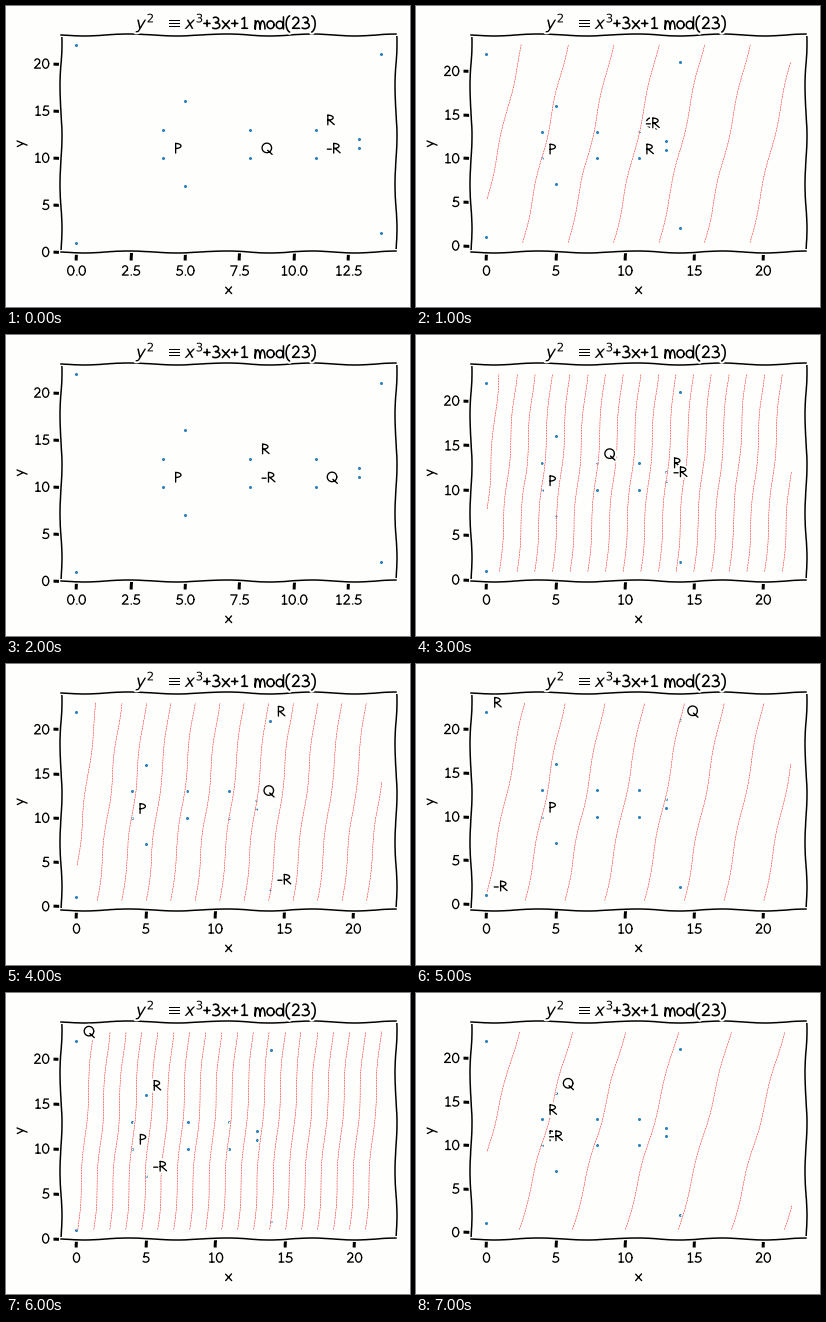
Animation, 404 px wide and 301 px high, one loop 8 s. Source, as a matplotlib script:

```python
import numpy as np
import matplotlib.pyplot as plt
from matplotlib.animation import FuncAnimation
from matplotlib.patches import PathPatch
from matplotlib.path import Path
from matplotlib.patheffects import Normal, Stroke, withStroke
from matplotlib.ticker import MultipleLocator
from matplotlib.transforms import IdentityTransform

W, H, DPI = 404, 301, 72
PAPER = "#fefefc"
LEFT, BOTTOM, WIDTH, HEIGHT = 55.2, H - 246.4, 334.8, 217.44

MOD, A, B = 23, 3, 1
P = (4, 10)
FIRST, STEPS = 6, 8
DX = 0.05   # gap left at the start of every wrapped stretch

plt.xkcd()
plt.rcParams.update({
    "font.family": "DejaVu Sans",
    "figure.facecolor": PAPER,
    "axes.facecolor": PAPER,
    "path.effects": [withStroke(linewidth=4, foreground=PAPER)],
})


# --- hand lettering from straight strokes and elliptic arcs, in ems ---

def seg(*pts):
    return np.array(pts, float)


def arc(cx, cy, rx, ry, start=0, stop=360):
    t = np.radians(np.linspace(start, stop, 32))
    return np.column_stack([cx + rx * np.cos(t), cy + ry * np.sin(t)])


CAP, BASE = 0.69, 0.04
stem = seg((0.1, 0), (0.1, CAP))
bowl = arc(0.1, 0.51, 0.38, 0.18, 90, -90)
arches = [arc(x, 0, 0.145, 0.48, 180, 0) for x in (0.235, 0.525)]

FONT = {
    " ": [],
    ".": [seg((0.13, BASE), (0.16, BASE))],
    "-": [seg((0.06, 0.28), (0.35, 0.28))],
    "+": [seg((0.24, 0.15), (0.24, 0.52)), seg((0.05, 0.33), (0.42, 0.33))],
    "(": [arc(0.37, 0.3, 0.28, 0.5, 105, 255)],
    ")": [arc(0, 0.3, 0.28, 0.5, 75, -75)],
    "0": [arc(0.3, 0.36, 0.22, 0.33)],
    "1": [seg((0.18, 0.58), (0.33, CAP), (0.33, BASE)),
          seg((0.17, BASE), (0.51, BASE))],
    "2": [arc(0.29, 0.51, 0.18, 0.19, 160, -40),
          seg((0.43, 0.39), (0.1, BASE), (0.52, BASE))],
    "3": [arc(0.25, 0.54, 0.19, 0.16, 130, -90),
          arc(0.25, 0.2, 0.26, 0.18, 90, -130)],
    "5": [seg((0.49, CAP), (0.2, CAP), (0.15, 0.4)),
          arc(0.27, 0.23, 0.24, 0.2, 120, -140)],
    "7": [seg((0.08, CAP), (0.53, CAP), (0.22, 0))],
    "P": [stem, bowl],
    "R": [stem, bowl, seg((0.2, 0.33), (0.56, 0.02))],
    "Q": [arc(0.4, 0.37, 0.34, 0.34), seg((0.46, 0.2), (0.78, -0.09))],
    "d": [arc(0.27, 0.24, 0.21, 0.22), seg((0.49, 0.72), (0.49, 0))],
    "m": [seg((0.09, 0), (0.09, 0.5)), *arches],
    "o": [arc(0.26, 0.25, 0.21, 0.23)],
    "x": [seg((0.08, 0.48), (0.51, 0.02)), seg((0.5, 0.5), (0.08, 0.02))],
    "y": [seg((0.06, 0.48), (0.26, 0.08)), seg((0.46, 0.5), (0.16, -0.22))],
}


def advance(c):
    return max((s[:, 0].max() for s in FONT[c]), default=0.23) + 0.07


def write(text, x, y, size=14, align=0, turned=False):
    """Letter a string at pixel x, y; align is 0 left, 0.5 centre, 1 right."""
    pen = -align * sum(map(advance, text))
    strokes = []
    for c in text:
        for s in FONT[c]:
            pts = (s + (pen, 0)) * size
            if turned:
                pts = pts[:, ::-1] * (-1, 1)
            strokes.append(Path(pts + (x, y)))
        pen += advance(c)
    lw = 0.095 * size
    ink = PathPatch(Path.make_compound_path(*strokes), fill=False, ec="black",
                    lw=lw, capstyle="round", joinstyle="round", zorder=3,
                    transform=IdentityTransform(), snap=False,
                    path_effects=[Stroke(linewidth=lw + 4, foreground=PAPER),
                                  Normal()])
    ink.set_sketch_params(None)
    ax.add_artist(ink)
    ink.set_clip_on(False)


# --- the curve over a finite field ---

def slope(p, q):
    if p == q:
        return (3 * p[0]**2 + A) * pow(2 * p[1], -1, MOD) % MOD
    return (q[1] - p[1]) * pow(q[0] - p[0], -1, MOD) % MOD


def add(p, q):
    m = slope(p, q)
    x = (m * m - p[0] - q[0]) % MOD
    return x, (m * (p[0] - x) - p[1]) % MOD


POINTS = np.array([(x, y) for x in range(MOD) for y in range(MOD)
                   if (y * y - x**3 - A * x - B) % MOD == 0])
MULTIPLES = [P]
while len(MULTIPLES) < FIRST + STEPS:
    MULTIPLES.append(add(MULTIPLES[-1], P))


# --- drawing ---

fig = plt.figure(figsize=(W / DPI, H / DPI), dpi=DPI)
ax = fig.add_axes([LEFT / W, BOTTOM / H, WIDTH / W, HEIGHT / H])


def draw_line(m):
    """Line of slope m through P, wrapped at the modulus; level lines stay hidden."""
    if m == 0:
        return
    b = (P[1] - m * P[0]) % MOD
    end = MOD - 1
    wraps = [(MOD * k - b) / m for k in range(1, m + 2)]
    edges = [0, *(x for x in wraps if x < end), end]
    xs, ys = [], []
    for k, (x0, x1) in enumerate(zip(edges, edges[1:])):
        if x1 - x0 > 2.5 * DX:
            x = np.linspace(x0 + DX, x1, 30)
            xs += [*x, np.nan]
            ys += [*(m * x + b - MOD * k), np.nan]
    ax.plot(xs, ys, "r--", lw=0.5)


def draw_ticks():
    (x0, x1), (y0, y1) = ax.get_xlim(), ax.get_ylim()
    step, digits = (2.5, 1) if x1 < 20 else (5, 0)
    ax.xaxis.set_major_locator(MultipleLocator(step))
    ax.yaxis.set_major_locator(MultipleLocator(5))
    ax.tick_params(labelbottom=False, labelleft=False)
    for v in np.arange(0, x1, step):
        write(f"{v:.{digits}f}", LEFT + WIDTH * (v - x0) / (x1 - x0),
              BOTTOM - 23.2, align=0.5)
    for v in np.arange(0, y1, 5):
        write(f"{v:.0f}", LEFT - 11.5,
              BOTTOM + HEIGHT * (v - y0) / (y1 - y0) - 5, align=1)


def draw_titles():
    base = BOTTOM + HEIGHT + 6
    for s, x in (("$y^2$", 130), (r"$\equiv$", 158), ("$x^3$", 179)):
        ax.text(x, base, s, fontsize=16.8, va="baseline",
                transform=IdentityTransform())
    write("+3x+1 mod(23)", 197, base, size=16.8)
    write("x", LEFT + WIDTH / 2, BOTTOM - 41.5, align=0.5)
    write("y", 18, BOTTOM + HEIGHT / 2, align=0.5, turned=True)


def update(i):
    ax.clear()
    q, r = MULTIPLES[FIRST + i - 1], MULTIPLES[FIRST + i]
    ax.scatter(*POINTS.T, s=1, lw=2, color="#1f77b4")
    draw_line(slope(P, q))
    draw_ticks()
    draw_titles()
    for name, (x, y) in (("P", P), ("Q", q), ("R", r), ("-R", (r[0], MOD - r[1]))):
        write(name, *ax.transData.transform((x + 0.5, y + 0.5)))
    return []


anim = FuncAnimation(fig, update, frames=STEPS, interval=1000, repeat=True,
                     repeat_delay=0, blit=False)
plt.show()
```
